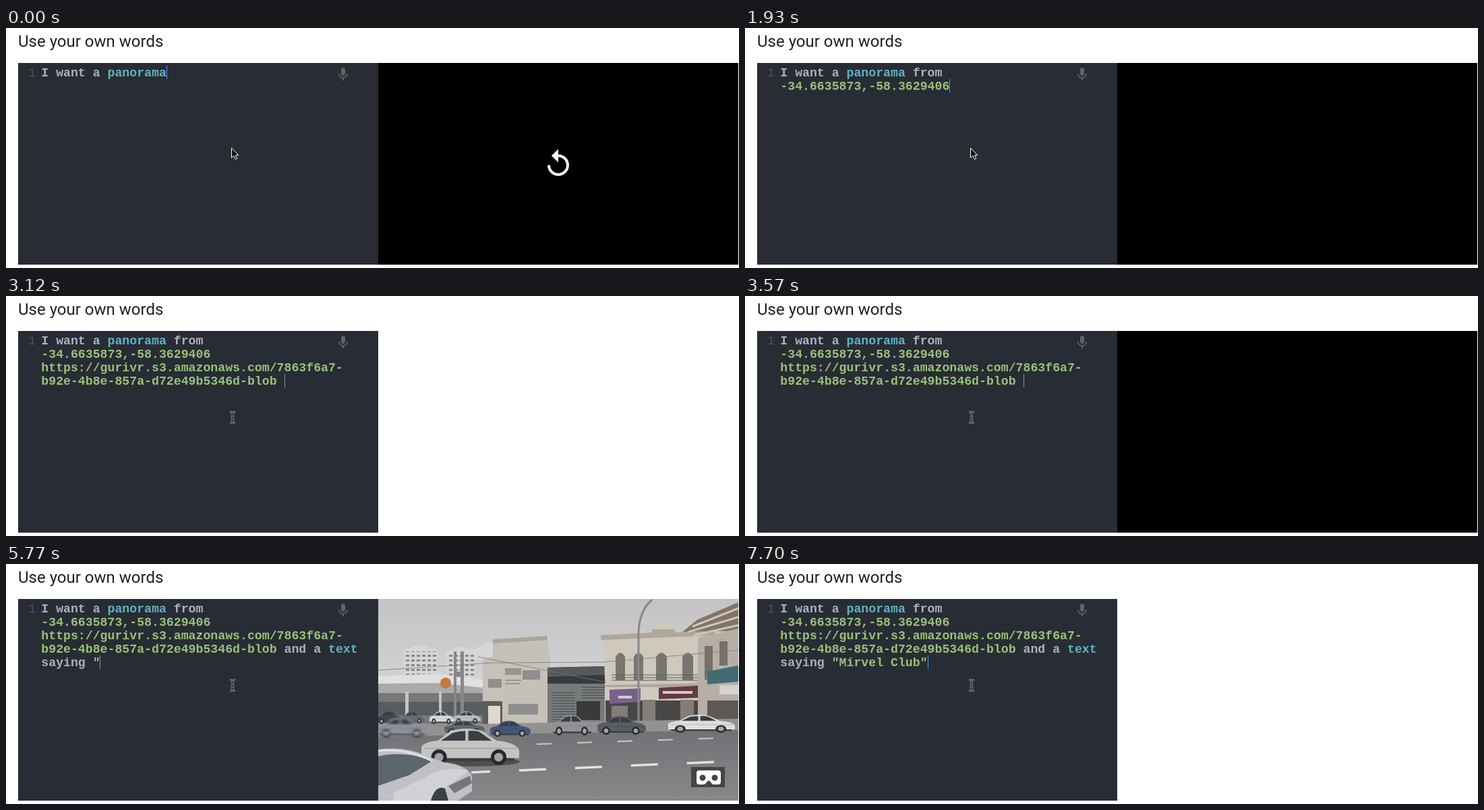
Recreate the animation shown at these times as an HTML page. Size 1087 by 357 pixels, loop 8 s.

```html
<!DOCTYPE html>
<html lang="en">
<head>
<meta charset="utf-8">
<title>Use your own words</title>
<style>
  html, body { margin: 0; width: 100%; height: 100%; overflow: hidden; background: #fff; }
  svg { display: block; position: absolute; left: 0; top: 0; }
  pre { position: absolute; margin: 0; top: 57px; font: bold 18.2px/20px "Liberation Mono", monospace; color: #abb2bf; }
  #code { left: 52.3px; }
  #line { left: 33px; font-weight: normal; color: #4b5162; }
  #caret { position: absolute; width: 1px; height: 20px; }
  .key { color: #5fb3c5; }
  .str { color: #98c379; }
</style>
</head>
<body>
<svg width="1087" height="357" viewBox="0 0 1087 357">
  <defs>
    <linearGradient id="sky" x2="0" y2="1"><stop stop-color="#c3c3c6"/><stop offset="1" stop-color="#dcdcdd"/></linearGradient>
    <linearGradient id="road" x2="0" y2="1"><stop stop-color="#717275"/><stop offset="1" stop-color="#88888b"/></linearGradient>
    <filter id="soft"><feGaussianBlur stdDeviation="2.5 1"/></filter>
    <pattern id="panes" width="8" height="7" patternUnits="userSpaceOnUse"><path d="M1 2h5v3H1z" fill="#85888c"/></pattern>
    <pattern id="slats" width="4" height="4" patternUnits="userSpaceOnUse"><path d="M0 3h4v1H0z" fill="#4b4e50"/></pattern>
    <symbol id="car" viewBox="0 0 100 38" preserveAspectRatio="none">
      <path d="M3 30h92v4H5z" fill="#3b3c3f"/>
      <path d="M0 31V19Q4 14 17 13L30 3Q47-2 62 3L77 13Q97 15 100 23V31Z" fill="currentColor"/>
      <path d="M20 13L32 5Q39 3 45 3V13ZM48 3Q57 2 61 5L72 13H48Z" fill="#393e44"/>
      <path d="M3 21H97" stroke="#0003"/>
      <g fill="#26282b"><circle cx="18" cy="30" r="8"/><circle cx="79" cy="30" r="8"/></g>
      <g fill="#a2a4a7"><circle cx="18" cy="30" r="4.5"/><circle cx="79" cy="30" r="4.5"/></g>
    </symbol>
  </defs>
  <text x="18" y="28" font-family="Roboto, sans-serif" font-size="24" fill="#212121">Use your own words</text>
  <rect id="gutter" x="18" y="52" width="35" height="300"/>
  <rect id="editor" x="52" y="52" width="500" height="300"/>
  <path transform="translate(488 57)" fill="#616365" d="M12 14c1.66 0 2.99-1.34 2.99-3L15 5c0-1.66-1.34-3-3-3S9 3.34 9 5v6c0 1.66 1.34 3 3 3zm5.3-3c0 3-2.54 5.1-5.3 5.1S6.7 14 6.7 11H5c0 3.41 2.72 6.23 6 6.72V21h2v-3.28c3.28-.48 6-3.3 6-6.72h-1.7z"/>
  <rect id="black" x="552" y="52" width="534" height="300"/>
  <path id="replay" transform="translate(795 178) scale(2)" fill="#fff" d="M12 5V1L7 6l5 5V7c3.31 0 6 2.69 6 6s-2.69 6-6 6-6-2.69-6-6H4c0 4.42 3.58 8 8 8s8-3.58 8-8-3.58-8-8-8z"/>

  <svg id="photo" x="552" y="52" width="534" height="300" viewBox="552 52 534 300">
    <rect x="552" y="52" width="534" height="200" fill="url(#sky)"/>
    <!-- towers and filling station -->
    <path d="M590 128L612 120 640 127V168H590ZM653 130L672 122 695 128V190H653ZM692 128L716 116 728 122V142H692Z" fill="#d6d6d4"/>
    <path d="M591 130h48v36h-48zM654 132h40v56h-40z" fill="url(#panes)"/>
    <path d="M552 188H710V240H552Z" fill="#77797a"/>
    <path d="M552 205H710V225H552Z" fill="#5a5d5f"/>
    <path d="M552 167L640 163 708 172V190H552Z" fill="#e0e0df"/>
    <path d="M552 178L640 177 708 184V192H552Z" fill="#a8aaab"/>
    <path d="M592 190h5v40h-5zM642 190h4v34h-4z" fill="#c3c4c4"/>
    <path d="M664 130h4v108h-4zM674 130h5v108h-5zM664 160h15v8h-15z" fill="#85888a"/>
    <circle cx="652" cy="177" r="8" fill="#c8793b"/>
    <!-- pale block -->
    <path d="M707 141L722 138V112L802 107 807 140V243H707Z" fill="#c6c1b6"/>
    <path d="M722 112L802 107 803 113 722 118Z" fill="#aaa59b"/>
    <path d="M740 155h24v10h-24zM740 172h24v2h-24zM740 177h22v2h-22z" fill="#969590"/>
    <path d="M766 158h26v14h-26zM715 171h20v13h-20zM745 208h44v16h-44z" fill="#8d908f"/>
    <path d="M707 204h29v34h-29z" fill="#5c5d5b"/>
    <path d="M715 211h18v27h-18z" fill="#ddd9d1"/>
    <!-- shuttered shop -->
    <path d="M803 154L888 152V242H803Z" fill="#777a7b"/>
    <path d="M803 154L888 152V166H803Z" fill="#56585a"/>
    <path d="M803 167L892 165V178H803Z" fill="#383b3e"/>
    <path d="M810 190h34v42h-34zM854 183h34v20h-34z" fill="url(#slats)"/>
    <path d="M846 204h35v28h-35z" fill="#393a3c"/>
    <!-- ornate house -->
    <path d="M886 107L930 105 958 100Q963 86 975 86T993 99L1025 101 1050 98V236H890Z" fill="#cec9bc"/>
    <path d="M882 106L958 102V97H992V102L1052 98V106L882 113ZM888 180L1046 177V183H888Z" fill="#aea89b"/>
    <path d="M904 173V138Q911 126 918 138V173ZM931 173V138Q938 126 945 138V173ZM964 173V138Q972 126 980 138V173ZM1003 173V138Q1011 126 1019 138V173Z" fill="#77766f"/>
    <path d="M898 165H1030M898 169H1030M898 173H1030" stroke="#5f605c" fill="none"/>
    <path d="M889 203H1040V237H889Z" fill="#484747"/>
    <path d="M898 211h24v24h-24zM944 202h19v33h-19zM1000 202h20v32h-20z" fill="#837d79"/>
    <path d="M895 187L941 185V205L895 208Z" fill="#79618c"/>
    <path d="M968 184L1026 181V199L968 201Z" fill="#633b40"/>
    <path d="M908 198h20M974 191h44" stroke="#d3cbd1" stroke-width="4"/>
    <!-- right-hand block -->
    <path d="M1003 101L1025 83 1086 57V100H1040Z" fill="#827568"/>
    <path d="M1018 93L1086 66M1012 101L1086 79M1020 106L1086 91" stroke="#cec6bc" stroke-width="3"/>
    <path d="M1026 110L1086 96V240H1026Z" fill="#b5afa6"/>
    <path d="M1036 122h12v50h-12zM1058 115h12v36h-12z" fill="#77716a"/>
    <path d="M1040 160L1086 151V175L1040 179Z" fill="#426b74"/>
    <path d="M1040 203h46v36h-46z" fill="#5e5855"/>
    <path d="M1058 180h28v14h-28z" fill="#d2d2d0"/>
    <path d="M552 158L720 147 886 146 1086 128M700 138L890 176" fill="none" stroke="#77797a" stroke-width=".8"/>
    <path d="M938 234V106Q938 70 958 53" fill="none" stroke="#85888b" stroke-width="3"/>
    <!-- street -->
    <path d="M552 237L700 238 1086 230V258H552Z" fill="#949290"/>
    <path d="M552 257L790 252 1086 247V352H552Z" fill="url(#road)"/>
    <path d="M787 268L1086 258" stroke="#c9c9c9" stroke-width="2" stroke-dasharray="22 38"/>
    <path d="M690 310L1086 293" stroke="#e2e2e2" stroke-width="3.5" stroke-dasharray="40 43" stroke-dashoffset="12"/>
    <use href="#car" x="550" y="219" width="38" height="19" color="#43484e"/>
    <use href="#car" x="586" y="219" width="34" height="18" color="#686c71"/>
    <use href="#car" x="628" y="219" width="36" height="19" color="#d9dadb"/>
    <use href="#car" x="664" y="219" width="40" height="18" color="#bcbec0"/>
    <use href="#car" x="650" y="233" width="60" height="20" color="#64676b"/>
    <use href="#car" x="550" y="228" width="75" height="30" color="#8a929c" filter="url(#soft)"/>
    <use href="#car" x="718" y="233" width="60" height="24" color="#42577c"/>
    <use href="#car" x="809" y="224" width="62" height="31" color="#909296"/>
    <use href="#car" x="877" y="226" width="72" height="28" color="#585d66"/>
    <use href="#car" x="982" y="224" width="99" height="27" color="#dedfdc"/>
    <ellipse cx="690" cy="294" rx="72" ry="7" fill="#4e4f52"/>
    <use href="#car" x="616" y="244" width="145" height="55" color="#c3c3c1"/>
    <path d="M552 276Q590 271 620 284L650 295Q685 299 691 316V338L670 352H552Z" fill="#bfc1c4"/>
    <path d="M552 286Q592 277 632 293L598 314 552 330Z" fill="#5d656d"/>
    <path d="M552 278Q592 273 632 293" fill="none" stroke="#e0e1e3" stroke-width="3"/>
    <path d="M575 340L640 308Q668 302 686 308L655 330 635 352H575Z" fill="#d0d2d5"/>
    <path d="M656 330L688 315 691 326 665 341Z" fill="#73777d"/>
    <path d="M630 352Q637 328 651 334L656 352Z" fill="#3d4043"/>
  </svg>

  <g id="badge">
    <path d="M1016 302h50v30h-50z" fill="#444548"/>
    <path fill="#fff" fill-rule="evenodd" d="M1028 307H1056Q1060 307 1060 311V324Q1060 328 1056 328H1050Q1047 328 1045 324.500Q1042 320 1039 324.500Q1037 328 1034 328H1028Q1024 328 1024 324V311Q1024 307 1028 307ZM1028.500 318a4.500 4.500 0 1 0 9 0a4.500 4.500 0 1 0-9 0ZM1046.500 318a4.500 4.500 0 1 0 9 0a4.500 4.500 0 1 0-9 0Z"/>
  </g>
  <path id="arrow" d="M334.500 178.500V193L337.800 190 340.300 195.300 342.800 194.200 340.500 189.200H344.800Z" fill="#111" stroke="#fff"/>
  <g id="beam" fill="none">
    <path d="M332 172.500Q336 172.500 336 176V185Q336 188.500 332 188.500M340 172.500Q336 172.500 336 176M336 185Q336 188.500 340 188.500M333.500 181.500H338.500" stroke="#8b8f96" stroke-width="3"/>
    <path d="M332 172.500Q336 172.500 336 176V185Q336 188.500 332 188.500M340 172.500Q336 172.500 336 176M336 185Q336 188.500 340 188.500M333.500 181.500H338.500" stroke="#17191d"/>
  </g>
</svg>
<pre id="line">1</pre>
<pre id="code"></pre>
<div id="caret"></div>
<script>
const LOOP = 8000, CHAR = 10.925;
const sentence = 'I want a panorama from -34.6635873,-58.3629406 ' +
  'https://gurivr.s3.amazonaws.com/7863f6a7-b92e-4b8e-857a-d72e49b5346d-blob ' +
  'and a text saying "Mirvel Club"';

// [time, characters typed]
const typing = [
  [0, 17], [150, 18], [295, 19], [440, 21], [585, 22], [730, 23],
  [1030, 46], [2970, 120], [3120, 121],
  [3870, 124], [4020, 125], [4170, 126], [4310, 127], [4460, 129],
  [4750, 131], [4900, 132], [5040, 133], [5190, 135], [5330, 136], [5480, 138], [5630, 139], [5770, 140],
  [6070, 141], [6360, 143], [6510, 145], [6660, 147],
  [6960, 148], [7110, 149], [7250, 150], [7400, 151], [7700, 152]
];
// [time, visible preview layers]
const preview = [
  [0, 'black replay'], [1030, ''], [1930, 'black'], [2080, 'badge'],
  [2970, ''], [3570, 'black'], [3870, 'photo badge'], [7700, '']
];

const $ = id => document.getElementById(id);
const at = (track, t) => track.findLast(([start]) => start <= t)[1];
const show = (id, on) => { $(id).style.display = on ? '' : 'none'; };
const wrap = s => s.replace(/ (?=-34|https|sa)/g, ' \n').replace('f6a7-', 'f6a7-\n');
const highlight = s => s.replace(/"[^"]*"|-34[\d.,-]+|https[^ ]+|panorama|text/g,
  m => `<span class="${/^[pt]/.test(m) ? 'key' : 'str'}">${m}</span>`);

let shown;
function draw(t) {
  const text = wrap(sentence.slice(0, at(typing, t)));
  if (text !== shown) $('code').innerHTML = highlight(shown = text);

  const lines = text.split('\n');
  const caret = $('caret').style;
  caret.left = Math.round(52 + lines.at(-1).length * CHAR) + 'px';
  caret.top = 36 + lines.length * 20 + 'px';
  caret.background = t < 1030 || t >= 7700 ? '#528bff' : '#8a909b';
  show('caret', t < 2520 || t >= 2970);

  const layers = at(preview, t).split(' ');
  for (const id of ['black', 'replay', 'photo', 'badge']) show(id, layers.includes(id));
  show('arrow', t < 2970);
  show('beam', t >= 2970);
  $('editor').setAttribute('fill', t < 1030 ? '#2a2c34' : '#282c34');
  $('gutter').setAttribute('fill', t < 2970 ? '#2a2c34' : '#282c34');
}

const begin = performance.now();
function tick() {
  draw((performance.now() - begin) % LOOP);
  requestAnimationFrame(tick);
}
tick();
</script>
</body>
</html>
```
